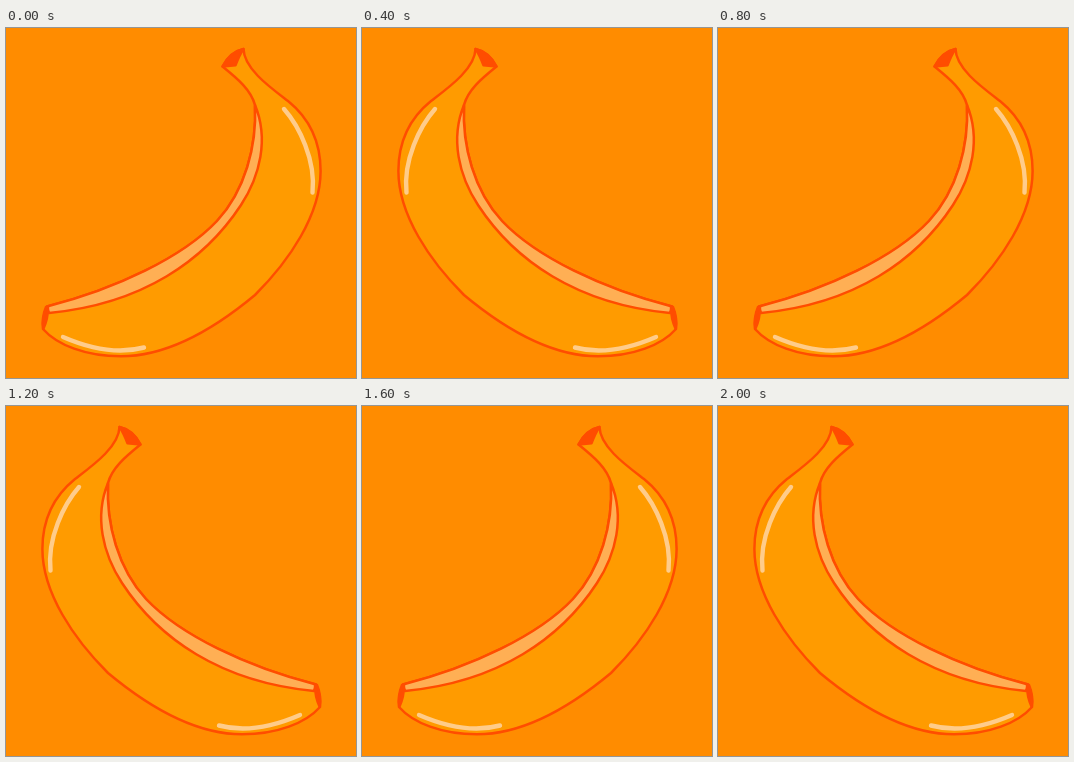
An HTML page with a canvas for the animation above (2.4 s loop, 350 by 350 pixels).

```html
<!DOCTYPE html>
<html lang="en">
<head>
<meta charset="utf-8">
<title>Banana</title>
<style>
  html, body { margin: 0; width: 100%; height: 100%; overflow: hidden; background: #ff8c00; }
  canvas { display: block; width: 350px; height: 350px; }
</style>
</head>
<body>
<canvas id="stage" width="350" height="350"></canvas>
<script>
const ctx = document.getElementById('stage').getContext('2d');
const STEP = 400;
const AXIS = 351; // x maps to AXIS - x when flipped
const LINE = '#ff4d00';

const outer = 'C238 41 265 60 282 73 C303 90 314.6 114 314.6 143 ' +
  'C314.6 187 283 233 249 267 C201 307 157 328.3 115 328.3 C80 328.3 51 317 37 301';
const inner = 'C251 118 239 163 211 193 C177 229 110 261 41 278.5';
const innerBack = 'C110 261 177 229 211 193 C239 163 251 118 249 77';

const body = new Path2D(`M237.5 21 ${outer} C36 293 38 285 41 278.5
  ${innerBack} C245 62 232 51 216.5 38.5 C221 30 228 23 237.5 21 Z`);
const ridge = new Path2D(`M249 77 ${inner} L43 285
  C137 276 199 232 235 177 C254 148 263 111 249 77 Z`);
const stemCap = new Path2D('M216.5 38.5 C221 30 228 23 237.5 21 C234 26 231.5 32 229.5 37.3 Z');
const tip = new Path2D('M40 279 L42 279.5 C42 287 40.5 294 37.5 300.5 C36 293 37.5 285 40 279 Z');
const shines = [
  new Path2D('M278 81 C293 98 310 132 306.5 164.5'),
  new Path2D('M57 309 C80 319 110 327 138 319.5')
];

function shape(path, fill) {
  ctx.fillStyle = fill;
  ctx.fill(path);
  ctx.strokeStyle = LINE;
  ctx.lineWidth = 2.5;
  ctx.stroke(path);
}

function draw(flipped) {
  ctx.setTransform(1, 0, 0, 1, 0, 0);
  ctx.fillStyle = '#ff8c00';
  ctx.fillRect(0, 0, 350, 350);
  if (flipped) ctx.setTransform(-1, 0, 0, 1, AXIS, 0);
  ctx.lineCap = ctx.lineJoin = 'round';

  shape(body, '#ff9b00');
  shape(ridge, '#ffaf54');
  shape(stemCap, LINE);
  shape(tip, LINE);

  ctx.strokeStyle = '#ffcc8a';
  ctx.lineWidth = 4.4;
  shines.forEach(path => ctx.stroke(path));
}

const start = performance.now();
function tick() {
  const t = performance.now() - start;
  draw(Math.floor(t / STEP) % 2 === 1);
  requestAnimationFrame(tick);
}
tick();
</script>
</body>
</html>
```
